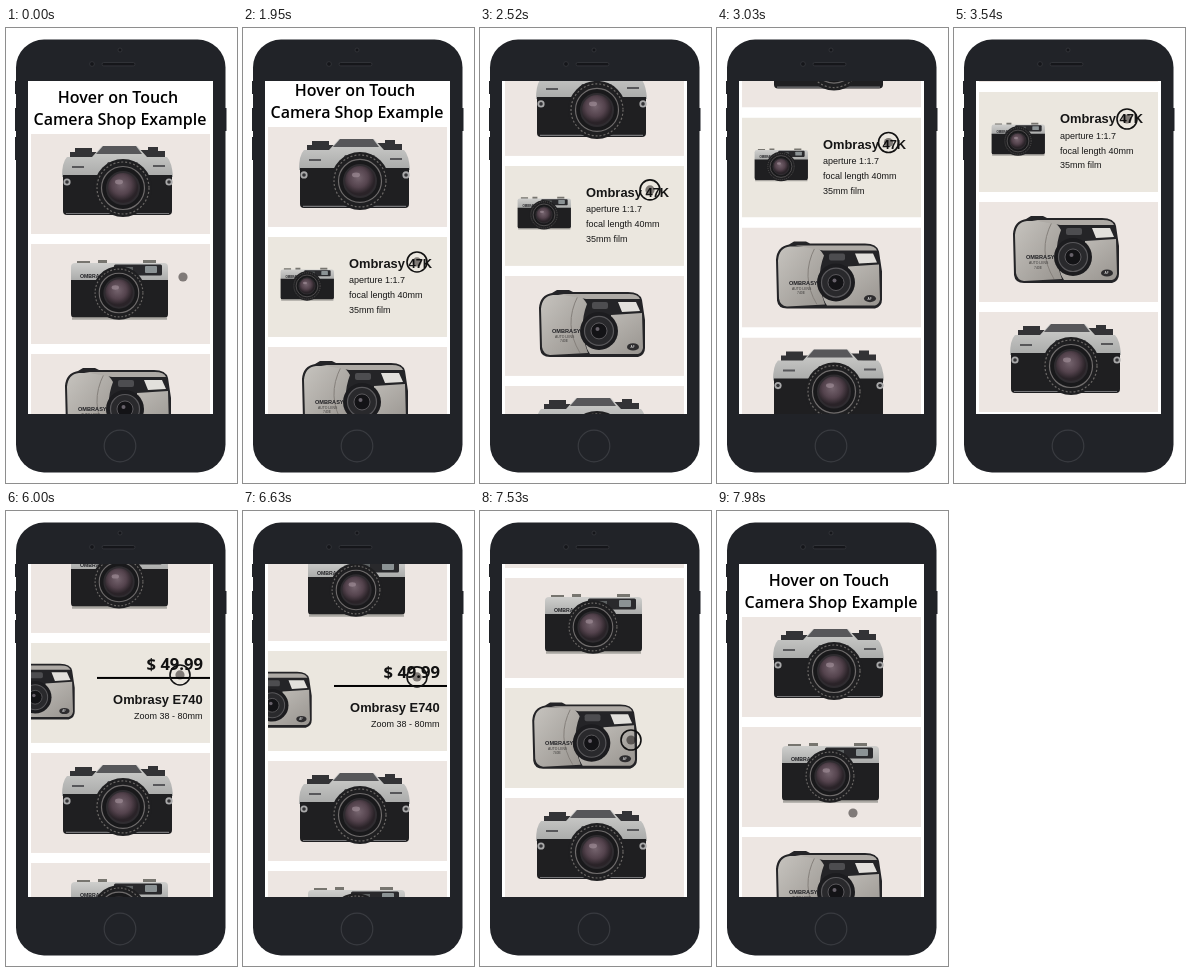
Animation, 231 px wide and 455 px high, one loop 8 s. Source, as an HTML page:

```html
<!DOCTYPE html>
<html lang="en">
<head>
<meta charset="utf-8">
<title>Hover on Touch</title>
<style>
  html, body { margin: 0; width: 100%; height: 100%; overflow: hidden; background: #fff; }
  svg { display: block; }
  .stage { width: 100vw; height: 100vh; }
  .head { font: 600 16px "Open Sans", sans-serif; text-anchor: middle; }
  .name { font: bold 12.9px "Liberation Sans", Arial, sans-serif; fill: #161616; }
  .spec { font: 9px "Liberation Sans", Arial, sans-serif; fill: #161616; }
  .price { font: bold 16.6px "Open Sans", sans-serif; fill: #111; }
  .mark { font: bold 6px "Liberation Sans", Arial, sans-serif; fill: #202024; }
  .tiny { font: 3.4px "Liberation Sans", Arial, sans-serif; fill: #3c3a39; }
  .end { text-anchor: end; }
</style>
</head>
<body>
<svg class="stage" viewBox="0 0 231 455" preserveAspectRatio="none">
  <defs>
    <clipPath id="screen"><rect x="22" y="53" width="185" height="333"/></clipPath>
    <clipPath id="card"><rect x="25" width="179" height="100"/></clipPath>
    <linearGradient id="silver" x2="0" y2="1">
      <stop stop-color="#cfcfcd"/><stop offset="1" stop-color="#a9aaa9"/>
    </linearGradient>
    <linearGradient id="cover" x2="1" y2="1">
      <stop stop-color="#c6c3be"/><stop offset="1" stop-color="#98948f"/>
    </linearGradient>
    <radialGradient id="glass" cx=".45" cy=".4">
      <stop stop-color="#75646e"/><stop offset=".6" stop-color="#54434d"/><stop offset="1" stop-color="#2a2328"/>
    </radialGradient>

    <g id="lens">
      <circle r="29" fill="#1f1f21"/>
      <circle r="26" fill="none" stroke="#6b6866" stroke-width="1.2" stroke-dasharray="2 2"/>
      <circle r="21.5" fill="#19191b" stroke="#6f6c6c" stroke-width="1.2"/>
      <circle r="16" fill="url(#glass)" stroke="#2f2c30" stroke-width="2"/>
      <ellipse cx="-4" cy="-6" rx="4" ry="2.4" fill="#a7949e" opacity=".6"/>
    </g>

    <g id="slr">
      <path d="M64 24v-6h5v-4h17v4h8v6zM134 23v-7h8v-3h10v4h7v7z" fill="#333336"/>
      <path d="M56 43q0-15 5-20h25l10-11h35l10 11h20q5 5 6 20z" fill="url(#silver)"/>
      <path d="M97 12h33l6 8H90z" fill="#57575a"/>
      <path d="M57 41h109v36q0 4-4 4H61q-4 0-4-4z" fill="#1f1f21"/>
      <path d="M60 79.5h103" stroke="#77777a" stroke-width="1.2"/>
      <circle cx="61" cy="48" r="3.6" fill="#a9a9aa"/><circle cx="61" cy="48" r="1.8" fill="#333336"/>
      <circle cx="163" cy="48" r="3.6" fill="#a9a9aa"/><circle cx="163" cy="48" r="1.8" fill="#333336"/>
      <path d="M66 33h12M147 32h12" stroke="#57575a" stroke-width="2"/>
      <text class="mark" x="101" y="32">OMBRASY</text>
      <use href="#lens" x="117" y="54"/>
    </g>

    <g id="finder">
      <path d="M71 20v-3h13v3h8v-4h9v4zM137 20v-4h13v4z" fill="#77756f"/>
      <path d="M65 37V23q0-4 4-4h89q4 0 4 4v14z" fill="url(#silver)"/>
      <rect x="108" y="20.5" width="48" height="11" rx="1.5" fill="#29292c"/>
      <rect x="113" y="23" width="14" height="6" fill="#5d6162"/>
      <rect x="139" y="22" width="12" height="7" rx="1" fill="#8b9294"/>
      <path d="M65 36h97v34q0 4-4 4H69q-4 0-4-4z" fill="#1f1f21"/>
      <path d="M66 74.5h95" stroke="#a9a6a1" stroke-width="2.4"/>
      <text class="mark" x="74" y="34" style="font-size:5.2px">OMBRASY</text>
      <use href="#lens" transform="translate(113 49) scale(.92)"/>
    </g>

    <g id="compact">
      <path d="M72 17l5-3h12l4 2h55q12 0 14 8l3 20v28q0 7-7 9H70q-9 0-10-8l-1-41q1-13 13-15z" fill="#242427"/>
      <path d="M61 33q1-13 12-14h25q5 2 9 9-9 23 1 49l-38 2q-7-1-8-8z" fill="url(#cover)"/>
      <path d="M98 20q-15 29 2 57" fill="none" stroke="#85807b" stroke-width="1"/>
      <path d="M78 18h71q9 0 11 5h-54z" fill="#aeaaa5"/>
      <path d="M131 39l31-2 1 35q-1 5-5 6h-48q-4-6-4-10 26 4 25-29z" fill="url(#cover)"/>
      <path d="M138 26h18l4 9-18 1z" fill="#e2e0dc"/>
      <rect x="112" y="26" width="16" height="7" rx="2" fill="#4d4d50"/>
      <circle cx="119" cy="55" r="19" fill="#1c1c1f"/>
      <circle cx="119" cy="55" r="14.5" fill="#29292c" stroke="#59585b" stroke-width="1.2"/>
      <circle cx="119" cy="55" r="8" fill="#131316" stroke="#6a686b" stroke-width=".8"/>
      <circle cx="117.500" cy="53" r="2" fill="#67616a"/>
      <ellipse cx="153" cy="71" rx="6" ry="3.6" fill="#2e2d2f"/>
      <text class="tiny" x="150.500" y="72.300" style="fill:#eee">AF</text>
      <text class="mark" x="72" y="57" style="font-size:5.6px">OMBRASY</text>
      <text class="tiny" x="75" y="62">AUTO LENS</text>
      <text class="tiny" x="80" y="66.500">740E</text>
    </g>
  </defs>

  <rect width="231" height="455" fill="#fff"/>
  <g fill="#212328">
    <rect x="9" y="53" width="3" height="13"/>
    <rect x="9" y="80" width="3" height="23"/>
    <rect x="9" y="109" width="3" height="23"/>
    <rect x="217" y="80" width="3.5" height="23"/>
    <rect x="10" y="11.500" width="209.500" height="433" rx="28"/>
  </g>
  <g fill="#15161a" stroke="#36383d" stroke-width=".8">
    <circle cx="114" cy="22" r="2"/>
    <circle cx="86" cy="36" r="2.4"/>
    <rect x="96" y="34.500" width="33" height="3.400" rx="1.700"/>
  </g>
  <circle cx="114" cy="418" r="15.800" fill="none" stroke="#393b40" stroke-width="1.200"/>

  <g clip-path="url(#screen)">
    <rect x="22" y="53" width="185" height="333" fill="#fff"/>
    <g id="page">
      <text class="head" x="112" y="75">Hover on Touch</text>
      <text class="head" x="114" y="97">Camera Shop Example</text>
      <g id="cards"></g>
    </g>
    <g id="cursor">
      <circle id="dot" r="4.6" fill="#8a8787" style="mix-blend-mode:multiply"/>
      <circle id="ring" r="10" fill="none" stroke="#111" stroke-width="1.6"/>
    </g>
  </g>
</svg>
<script>
const LOOP = 8000, FIRST = 106, PITCH = 110;
const PLAIN = '#ede6e2', HOVERED = '#ebe7df';
const $ = id => document.getElementById(id);
const clamp = v => Math.max(0, Math.min(1, v));
const ease = v => { v = clamp(v); return v * v * (3 - 2 * v); };
const span = (t, a, b) => ease((t - a) / (b - a));
const within = (t, a, b) => t >= a && t < b;

const info = [
  '',
  `<text class="name" x="106" y="31">Ombrasy 47K</text>
   <text class="spec" x="106" y="46.5">aperture 1:1.7</text>
   <text class="spec" x="106" y="61.5">focal length 40mm</text>
   <text class="spec" x="106" y="76">35mm film</text>`,
  `<text class="price end" x="197" y="27">$ 49.99</text>
   <text class="name end" x="196.7" y="61">Ombrasy E740</text>
   <text class="spec end" x="196.5" y="76.5">Zoom 38 - 80mm</text>`
];
const kinds = ['slr', 'finder', 'compact'];

$('cards').innerHTML = Array.from({ length: 6 }, (_, i) => `
  <g transform="translate(0 ${FIRST + i * PITCH})" clip-path="url(#card)">
    <rect id="bg${i}" x="25" width="179" height="100" fill="${PLAIN}"/>
    <use id="cam${i}" href="#${kinds[i % 3]}"/>
    <g id="info${i}" opacity="0">${info[i % 3]}</g>
    ${i === 2 ? '<rect id="rule" y="34" height="2"/>' : ''}
  </g>`).join('');

// Smooth curve through [time, value] points that never overshoots.
function track(keys) {
  const n = keys.length - 1;
  const slope = i => (keys[i + 1][1] - keys[i][1]) / (keys[i + 1][0] - keys[i][0]);
  const tangent = i => {
    if (i === 0 || i === n) return 0;
    const a = slope(i - 1), b = slope(i);
    return a * b <= 0 ? 0 : 2 * a * b / (a + b);
  };
  return t => {
    if (t <= keys[0][0]) return keys[0][1];
    if (t >= keys[n][0]) return keys[n][1];
    let i = 0;
    while (t >= keys[i + 1][0]) i++;
    const h = keys[i + 1][0] - keys[i][0], u = (t - keys[i][0]) / h, v = 1 - u;
    return keys[i][1] * v * v * (1 + 2 * u) + keys[i + 1][1] * u * u * (3 - 2 * u)
      + h * u * v * (tangent(i) * v - tangent(i + 1) * u);
  };
}

const scroll = track([[1650, 0], [1950, -7], [2520, -78], [3300, -144], [3540, -152],
  [5430, -152], [6000, -194], [6300, -212], [7050, -149], [7530, -149], [7800, -50], [7970, 0]]);
const cursorX = track([[0, 177], [280, 130], [500, 54], [680, 90], [900, 186], [1080, 140], [1300, 175],
  [1950, 174], [2520, 170], [3540, 173], [4120, 173], [4400, 174], [7050, 174],
  [7400, 151], [7530, 151], [7850, 136]]);
const cursorY = track([[0, 249], [260, 126], [500, 230], [700, 381], [900, 220], [1080, 70], [1300, 241],
  [1650, 241], [1950, 234], [2520, 162], [3300, 98], [3540, 91], [4120, 91], [4400, 206], [5430, 206],
  [6000, 164], [6300, 146], [7050, 208], [7400, 229], [7530, 229], [7850, 302]]);

function showCard(i, hover, slide, scale, cy) {
  const k = 1 + (scale - 1) * hover;
  $('cam' + i).setAttribute('transform',
    `translate(${113 + slide * hover} ${cy}) scale(${k}) translate(-113 ${-cy})`);
  $('info' + i).setAttribute('opacity', clamp(hover * 2 - 1));
}

function draw(t) {
  $('page').setAttribute('transform', `translate(0 ${scroll(t)})`);
  const a = span(t, 1250, 1600) - span(t, 4130, 4480);
  const tap = 0.1 * (span(t, 7450, 7560) - span(t, 7560, 7700));
  const b = span(t, 4430, 4800) - span(t, 7050, 7400) + tap;
  showCard(1, a, -49, 0.55, 49);
  showCard(2, b, -89, 0.86, 50);
  const rule = 113 * clamp(b * 2 - 1);
  $('rule').setAttribute('x', 204 - rule);
  $('rule').setAttribute('width', rule);
  const tint = on => on ? HOVERED : PLAIN;
  $('bg1').setAttribute('fill', tint(within(t, 1250, 4130)));
  $('bg2').setAttribute('fill', tint(within(t, 4420, 7050) || within(t, 7450, 7850)));
  const touch = within(t, 1250, 4120) || within(t, 4400, 7050) || within(t, 7440, 7850);
  $('cursor').setAttribute('transform', `translate(${cursorX(t)} ${cursorY(t)})`);
  $('ring').setAttribute('opacity', touch ? 1 : 0);
}

const start = performance.now();
function tick() {
  draw((performance.now() - start) % LOOP);
  requestAnimationFrame(tick);
}
tick();
</script>
</body>
</html>
```
